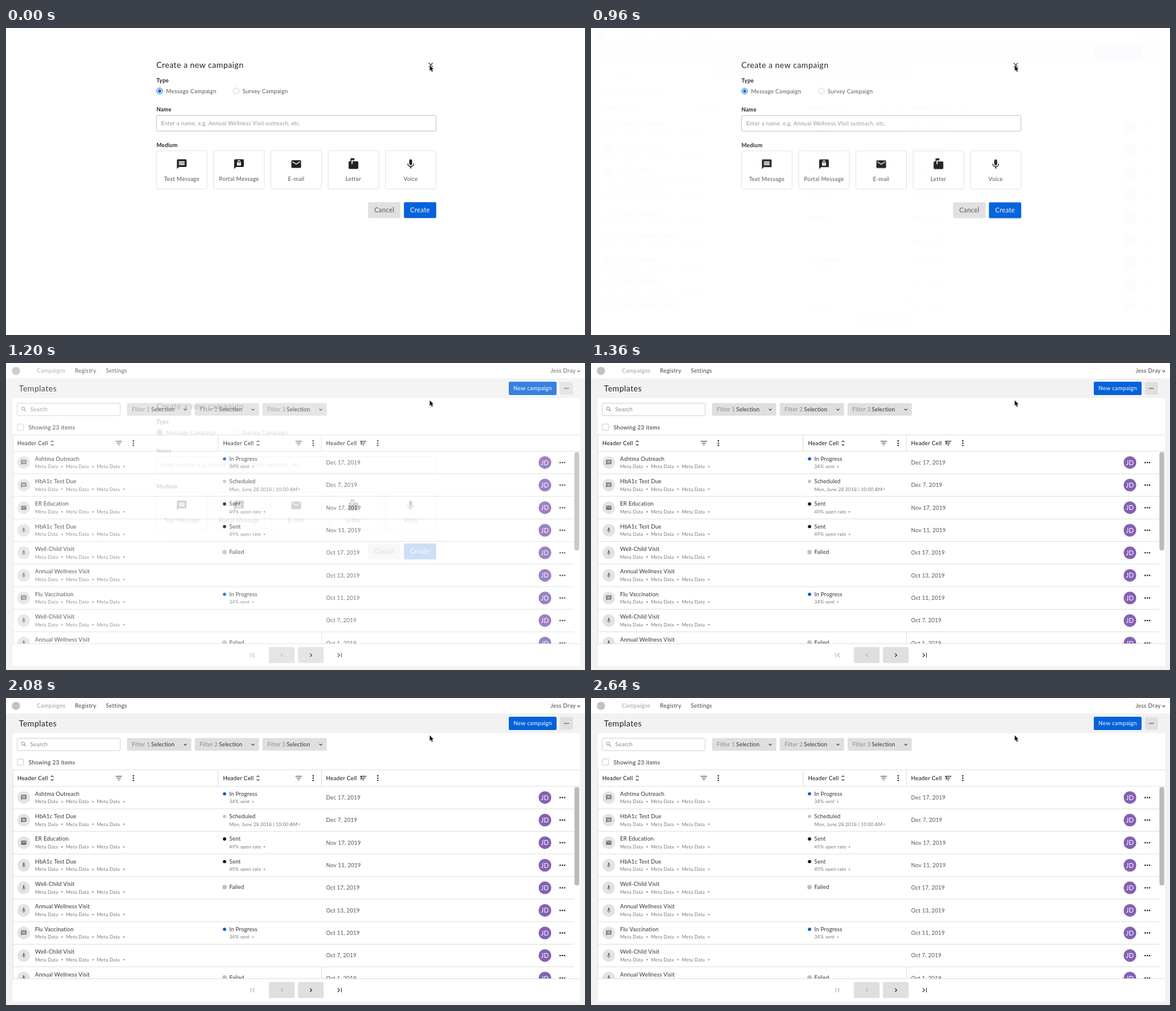
Write an HTML page with a canvas that moves like this. It is 957 px wide and 508 px high and loops after 2720 ms.

```html
<!DOCTYPE html>
<html lang="en">
<head>
<meta charset="utf-8">
<title>Campaign templates</title>
<style>
html, body { margin: 0; width: 100%; height: 100%; overflow: hidden; background: #fff; }
canvas { display: block; }
</style>
</head>
<body>
<canvas id="stage" width="957" height="508"></canvas>
<script>
const W = 957, H = 508, LOOP = 2720;
const FADE_START = 930, FADE_END = 1310, SLIDE = 13;
const BLUE = '#0462da', GREY = '#dfdfdf', LINE = '#dedede';
const ROW_TOP = 146, ROW_H = 37.35;

const stage = document.getElementById('stage').getContext('2d');
let c = stage;

function layer(paint) {
  const el = document.createElement('canvas');
  el.width = W;
  el.height = H;
  c = el.getContext('2d');
  paint();
  c = stage;
  return el;
}

// y is the middle of the capitals
function text(str, x, y, { size = 9.3, color = '#333', weight = 400, align = 'left', track = 0.03 } = {}) {
  c.font = `${weight} ${size}px Lato, "Open Sans", sans-serif`;
  c.letterSpacing = `${(size * track).toFixed(2)}px`;
  c.textAlign = align;
  c.fillStyle = color;
  c.fillText(str, x, y + size * 0.36);
}

function box(x, y, w, h, fill, stroke, r = 2) {
  c.beginPath();
  c.roundRect(x, y, w, h, r);
  if (fill) { c.fillStyle = fill; c.fill(); }
  if (stroke) { c.strokeStyle = stroke; c.lineWidth = 1; c.stroke(); }
}

function dot(x, y, r, color) {
  c.beginPath();
  c.arc(x, y, r, 0, Math.PI * 2);
  c.fillStyle = color;
  c.fill();
}

function ring(x, y, r, color, width = 1) {
  c.beginPath();
  c.arc(x, y, r, 0, Math.PI * 2);
  c.strokeStyle = color;
  c.lineWidth = width;
  c.stroke();
}

function line(points, color, width = 1) {
  c.beginPath();
  points.forEach(([x, y]) => c.lineTo(x, y));
  c.strokeStyle = color;
  c.lineWidth = width;
  c.stroke();
}

// dx, dy: half extents; the sign gives the direction of the tip
const chevronV = (x, y, dx, dy, color, w = 1.1) =>
  line([[x - dx, y - dy], [x, y + dy], [x + dx, y - dy]], color, w);
const chevronH = (x, y, dx, dy, color, w = 1.1) =>
  line([[x - dx, y - dy], [x + dx, y], [x - dx, y + dy]], color, w);

function dots(x, y, dx, dy, r, color = '#222') {
  for (const k of [-1, 0, 1]) dot(x + k * dx, y + k * dy, r, color);
}

const BUBBLE = 'M20 2H4c-1.1 0-2 .9-2 2v18l4-4h14c1.1 0 2-.9 2-2V4c0-1.1-.9-2-2-2z';
const ICONS = {
  chat: BUBBLE + 'M6 6h12v2H6zM6 9h12v2H6zM6 12h12v2H6z',
  portal: BUBBLE + 'M8 9h8v6H8zM9 9V7a3 3 0 0 1 6 0v2h-1.5V7a1.5 1.5 0 0 0-3 0v2zM11.2 11.2h1.6v1.6h-1.6z',
  mail: 'M20 4H4c-1.1 0-2 .9-2 2v12c0 1.1.9 2 2 2h16c1.1 0 2-.9 2-2V6c0-1.1-.9-2-2-2zm0 4l-8 5-8-5V6l8 5 8-5z',
  letter: 'M20 6H10v6H8V4h6V0H6v6H4c-1.1 0-2 .9-2 2v12c0 1.1.9 2 2 2h16c1.1 0 2-.9 2-2V8c0-1.1-.9-2-2-2z',
  mic: 'M12 14c1.66 0 3-1.34 3-3V5c0-1.66-1.34-3-3-3S9 3.34 9 5v6c0 1.66 1.34 3 3 3z' +
    'M17.3 11c0 3-2.54 5.1-5.3 5.1S6.7 14 6.7 11H5c0 3.41 2.72 6.23 6 6.72V21h2v-3.28c3.28-.48 6-3.3 6-6.72z'
};

function icon(name, x, y, scale, color) {
  c.save();
  c.translate(x, y);
  c.scale(scale, scale);
  c.translate(-12, -12);
  c.fillStyle = color;
  c.fill(new Path2D(ICONS[name]), 'evenodd');
  c.restore();
}

const STATUS = {
  progress: ['In Progress', '34% sent', '#0c58cf', 408],
  scheduled: ['Scheduled', 'Mon, June 28 2018 | 10:00 AM', '#c0c0c0', 484.5],
  sent: ['Sent', '49% open rate', '#101018', 427],
  failed: ['Failed', '', '#c0c0c0', 0]
};

const ROWS = [
  ['chat', 'Ashtma Outreach', 'progress', 'Dec 17, 2019'],
  ['chat', 'HbA1c Test Due', 'scheduled', 'Dec 7, 2019'],
  ['mail', 'ER Education', 'sent', 'Nov 17, 2019'],
  ['mic', 'HbA1c Test Due', 'sent', 'Nov 11, 2019'],
  ['mic', 'Well-Child Visit', 'failed', 'Oct 17, 2019'],
  ['mic', 'Annual Wellness Visit', '', 'Oct 13, 2019'],
  ['chat', 'Flu Vaccination', 'progress', 'Oct 11, 2019'],
  ['mic', 'Well-Child Visit', '', 'Oct 7, 2019'],
  ['mic', 'Annual Wellness Visit', 'failed', 'Oct 1, 2019']
];

const CELL = { size: 9.25, track: 0.015 };
const DATE = { ...CELL, color: '#555' };
const NOTE = { size: 7.9, track: 0.02, color: '#777' };

function paintStatus(key, y) {
  const [label, note, color, end] = STATUS[key];
  const top = y + (note ? 12.4 : 17.4);
  dot(361.2, top + 0.2, note ? 2.7 : 3.7, color);
  text(label, 369, top, CELL);
  if (!note) return;
  text(note, 369, y + 25.4, NOTE);
  dot(end, y + 25.5, 1.2, '#999');
}

function paintRow([kind, title, status, date], i) {
  const y = ROW_TOP + i * ROW_H, mid = y + 18.7, rule = y + ROW_H;
  dot(29.3, mid, 10.5, '#e3e3e3');
  icon(kind, 29.3, mid, 0.44, '#737373');
  text(title, 48, y + 12.4, CELL);
  for (let k = 0; k < 3; k++) {
    text('Meta Data', 48 + k * 51, y + 25.4, NOTE);
    dot(92.7 + k * 51, y + 25.5, 1.3, '#999');
  }
  if (status) paintStatus(status, y);
  text(date, 529, mid, DATE);
  dot(890.8, mid, 10.5, '#8461b4');
  text('JD', 890.9, mid + 0.2, { size: 10.6, color: '#fff', align: 'center' });
  dots(919.6, mid, 3.7, 0, 1.2);
  line([[11, rule], [939, rule]], LINE);
}

function sortMark(x) {
  chevronV(x, 129.8, 2.2, -1.1, '#333');
  chevronV(x, 135.4, 2.2, 1.1, '#333');
}

function filterMark(x, color) {
  [5.2, 3.4, 1.4].forEach((half, i) =>
    line([[x - half, 129.5 + i * 3], [x + half, 129.5 + i * 3]], color, 1.1));
}

function paintTop() {
  c.fillStyle = '#f2f2f2';
  c.fillRect(0, 0, W, H);
  c.fillStyle = '#fff';
  c.fillRect(0, 0, W, 25.5);
  dot(16.5, 13, 6.8, '#c2c2c2');
  text('Campaigns', 51, 13, { color: '#acacac', weight: 600 });
  text('Registry', 114, 13, { color: '#444' });
  text('Settings', 165, 13, { color: '#444' });
  text('Jess Dray', 941.5, 13, { color: '#444', align: 'right' });
  chevronV(946.6, 13.5, 2.2, 1.1, '#444');

  text('Templates', 21.5, 42.3, { size: 13.3, color: '#222' });
  box(831, 31, 79, 22, BLUE);
  text('New campaign', 870.6, 42, { color: '#fff', align: 'center' });
  box(915.6, 31.5, 21.4, 21, GREY);
  dots(926.3, 42, 2.8, 0, 0.9, '#444');
}

function paintTools() {
  box(11, 58, 938, 444, '#fff');
  box(18.5, 66.5, 170.3, 20.5, '#fff', '#cfcfcf');
  ring(28.2, 75.4, 2.6, '#888');
  line([[30.2, 77.4], [33, 80.2]], '#888', 1.1);
  text('Search', 40, 77, { color: '#8a8a8a' });
  for (let k = 0; k < 3; k++) {
    const x = 200 + k * 112;
    box(x, 66.3, 106.3, 21, GREY);
    text(`Filter ${k + 1}`, x + 8, 77, { ...CELL, color: '#8a8a8a' });
    text('Selection', x + 40, 77, { ...CELL, color: '#333' });
    chevronV(x + 96.2, 77, 2.4, 1.2, '#444');
  }
  box(18.8, 101, 10.2, 10.2, '#fff', '#cacaca', 1);
  text('Showing 23 items', 37.3, 106.4);
}

function paintTable() {
  const head = { color: '#111' };
  text('Header Cell', 18.7, 132.8, head);
  sortMark(76.4);
  filterMark(186.5, '#444');
  dots(210.5, 132.6, 0, 3.8, 1.2);
  text('Header Cell', 358.7, 132.8, head);
  sortMark(416.5);
  filterMark(483.7, '#444');
  dots(507.7, 132.6, 0, 3.8, 1.2);
  text('Header Cell', 529, 132.8, head);
  filterMark(590.4, '#111');
  line([[587, 130], [587, 135.5]], '#111', 1.1);
  dots(614.5, 132.6, 0, 3.8, 1.2);

  line([[11, 118.9], [949, 118.9]], LINE);
  line([[11, ROW_TOP], [949, ROW_TOP]], LINE);
  for (const x of [350.5, 521.5]) line([[x, 119], [x, ROW_TOP]], LINE);

  c.save();
  c.beginPath();
  c.rect(11, ROW_TOP, 938, 318.5);
  c.clip();
  ROWS.forEach(paintRow);
  line([[521.5, 445], [521.5, 465]], LINE);
  c.restore();

  line([[11.5, 119], [11.5, 465]], LINE);
  box(939.5, 147.3, 8, 163, '#bbb', null, 4);
  line([[11, 464.5], [949, 464.5]], LINE);
}

function paintPager() {
  const y = 483.4;
  line([[404.8, y - 3.8], [404.8, y + 3.8]], '#aaa');
  chevronH(409.4, y, -1.6, 3.2, '#aaa');
  box(434.4, 470, 42.6, 26.6, GREY);
  chevronH(456, y, -1.4, 2.8, '#aaa');
  box(482.4, 470, 42.6, 26.6, GREY);
  chevronH(504, y, 1.4, 2.8, '#111');
  chevronH(549.8, y, 1.6, 3.2, '#222');
  line([[554.4, y - 3.8], [554.4, y + 3.8]], '#222');
}

function paintDialog() {
  const label = { size: 9, color: '#222', weight: 700 };
  const soft = { color: '#555' };
  text('Create a new campaign', 248.5, 61.2, { size: 13.3, color: '#222' });
  line([[698.6, 57.6], [705.4, 64.4]], '#222', 1.1);
  line([[705.4, 57.6], [698.6, 64.4]], '#222', 1.1);

  text('Type', 248.7, 87.2, label);
  ring(254, 104.2, 4.8, BLUE);
  dot(254, 104.2, 2.7, BLUE);
  text('Message Campaign', 264.5, 104.4, soft);
  ring(380.6, 104.2, 4.9, '#ccc');
  text('Survey Campaign', 391, 104.4, soft);

  text('Name', 248.7, 135.2, label);
  box(248.7, 144.5, 462, 26, '#fff', '#c2c2c2');
  text('Enter a name, e.g. Annual Wellness Visit outreach, etc.', 256.5, 157.6, { size: 9.1, color: '#999' });

  text('Medium', 248.7, 193.8, label);
  const media = [['chat', 'Text Message'], ['portal', 'Portal Message'], ['mail', 'E-mail'],
    ['letter', 'Letter'], ['mic', 'Voice']];
  media.forEach(([name, title], i) => {
    const x = 248.7 + i * 94.6;
    box(x, 203, 83.6, 63.4, '#fff', '#e2e2e2');
    icon(name, x + 41.8, 225.2, 0.8, '#222');
    text(title, x + 41.8, 249.8, { ...soft, align: 'center' });
  });

  box(598.5, 288.3, 53.6, 26.3, '#e0e0e0');
  text('Cancel', 625.3, 301.4, { size: 10.6, color: '#555', align: 'center' });
  box(657.7, 288.3, 53.4, 26.3, BLUE);
  text('Create', 684.4, 301.4, { size: 10.6, color: '#fff', align: 'center' });
}

function paintCursor(x, y) {
  c.save();
  c.translate(x, y);
  c.beginPath();
  [[0, 0], [0, 9], [2, 7.2], [3.5, 10.6], [5, 9.9], [3.6, 6.6], [6.2, 6.4]]
    .forEach(([px, py]) => c.lineTo(px, py));
  c.closePath();
  c.lineJoin = 'round';
  c.lineWidth = 1.6;
  c.strokeStyle = '#fff';
  c.stroke();
  c.fillStyle = '#111';
  c.fill();
  c.restore();
}

const page = layer(() => {
  paintTop();
  paintTools();
  paintTable();
  paintPager();
});
const dialog = layer(paintDialog);
const sheet = layer(() => {});
const sheetCtx = sheet.getContext('2d');

function smooth(t) {
  const k = Math.min(1, Math.max(0, (t - FADE_START) / (FADE_END - FADE_START)));
  return k * k * (3 - 2 * k);
}

function draw(t) {
  const k = smooth(t);
  stage.drawImage(page, 0, 0);
  if (k < 1) {
    sheetCtx.fillStyle = '#fff';
    sheetCtx.fillRect(0, 0, W, H);
    sheetCtx.drawImage(dialog, 0, SLIDE * k);
    stage.globalAlpha = 1 - k;
    stage.drawImage(sheet, 0, 0);
    stage.globalAlpha = 1;
  }
  paintCursor(700.4, 61.8);
}

const start = performance.now();
function tick() {
  draw((performance.now() - start) % LOOP);
  requestAnimationFrame(tick);
}
tick();
</script>
</body>
</html>
```
